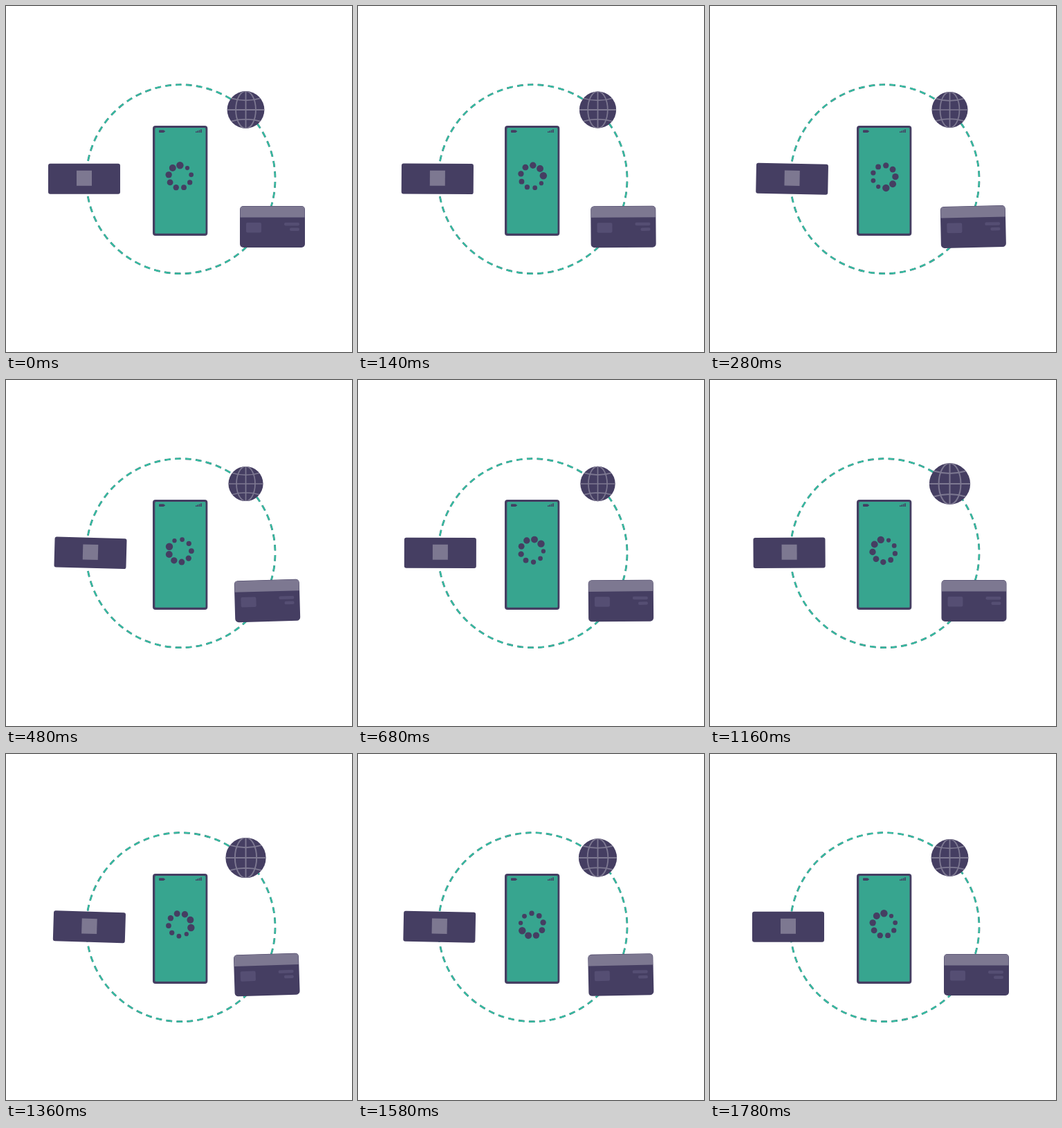
These frames come from a looping animation (500x500 px, 1.8 s). An HTML page with a canvas:

```html
<!DOCTYPE html>
<html lang="en">
<head>
<meta charset="utf-8">
<title>Payment loader</title>
<style>
html, body { margin: 0; width: 100%; height: 100%; overflow: hidden; background: #fff; }
canvas { display: block; width: 500px; height: 500px; }
</style>
</head>
<body>
<canvas id="stage"></canvas>
<script>
const LOOP = 1800, STEP = 20, TAU = Math.PI * 2;
const DARK = '#453e62', MUTED = '#7d7891', FAINT = '#554e73', GREEN = '#37a58f';

const canvas = document.getElementById('stage');
const ctx = canvas.getContext('2d');
const dpr = window.devicePixelRatio || 1;
canvas.width = canvas.height = 500 * dpr;

// Keys are [progress, value] pairs, eased in and out between neighbours.
const globeR = [[0, 26.9], [1 / 3, 24.9], [2 / 3, 29.7], [1, 26.9]];
const badgeX = [[0, 113], [.27, 122], [.57, 112], [.8, 121], [1, 113]];
const badgeTilt = [[0, 0], [.25, 1.6], [.54, -1.8], [.8, 1.9], [1, 0]];
const cardX = [[0, 385], [.27, 377.5], [.55, 384.4], [.8, 376.3], [1, 385]];
const cardTilt = [[0, 0], [.24, -1.7], [.55, 1.1], [.8, -2], [1, 0]];

function tween(keys, p) {
  let i = 1;
  while (i < keys.length - 1 && p > keys[i][0]) i++;
  const [p0, a] = keys[i - 1], [p1, b] = keys[i];
  const u = (p - p0) / (p1 - p0);
  return a + (b - a) * u * u * (3 - 2 * u);
}

function box(x, y, w, h, r, color) {
  ctx.fillStyle = color;
  ctx.beginPath();
  ctx.roundRect(x, y, w, h, r);
  ctx.fill();
}

function dot(x, y, r, color) {
  ctx.fillStyle = color;
  ctx.beginPath();
  ctx.arc(x, y, r, 0, TAU);
  ctx.fill();
}

function placed(x, y, deg, draw) {
  ctx.save();
  ctx.translate(x, y);
  ctx.rotate(deg * Math.PI / 180);
  draw();
  ctx.restore();
}

function ring(p) {
  const r = 136.5, pitch = TAU * r / 57, dash = 8.6;
  ctx.save();
  ctx.translate(252.5, 250.2);
  ctx.rotate(-Math.PI / 2 - (3.3 + p * 3.5) / r);
  ctx.setLineDash([dash, pitch - dash]);
  ctx.lineDashOffset = dash / 2;
  for (const [width, color] of [[2.7, '#3f6b70'], [2, '#34c2a5']]) {
    ctx.lineWidth = width;
    ctx.strokeStyle = color;
    ctx.beginPath();
    ctx.arc(0, 0, r, 0, TAU);
    ctx.stroke();
  }
  ctx.restore();
}

function phone() {
  box(212, 173, 79.3, 159, 4, DARK);
  box(215.3, 176, 73.2, 152.8, 1.5, GREEN);
  box(221, 179.2, 7.6, 3.8, 1, DARK);
  box(228, 180.2, 1.8, 1.8, .5, DARK);
  for (let i = 0; i < 4; i++) {
    const h = 1.8 + i * .95;
    box(274 + i * 2.4, 183 - h, 1.6, h, 0, DARK);
  }
}

function spinner(p) {
  for (let i = 0; i < 9; i++) {
    const a = -Math.PI / 2 + TAU * (p * 3 - i / 9);
    dot(251.4 + 16.5 * Math.cos(a), 246.7 + 16.5 * Math.sin(a), 5.2 - i * .26, DARK);
  }
}

function globe(p) {
  const s = tween(globeR, p) / 27;
  ctx.save();
  ctx.translate(346.5, 150);
  ctx.scale(s, s);
  dot(0, 0, 27, DARK);
  ctx.clip();
  ctx.strokeStyle = MUTED;
  ctx.lineWidth = 1.8;
  ctx.beginPath();
  ctx.moveTo(0, -27);
  ctx.lineTo(0, 27);
  ctx.moveTo(-27, 0);
  ctx.lineTo(27, 0);
  for (const k of [-1, 1]) {
    ctx.moveTo(-22, 17 * k);
    ctx.quadraticCurveTo(0, 10.5 * k, 22, 17 * k);
  }
  ctx.moveTo(14.5, 0);
  ctx.ellipse(0, 0, 14.5, 27, 0, 0, TAU);
  ctx.stroke();
  ctx.restore();
}

function badge() {
  box(-52, -22, 104, 44, 3, DARK);
  box(-11, -12, 22, 22, 0, MUTED);
}

function card() {
  box(-47, -30, 94, 60, 5, DARK);
  box(-46.5, -29.5, 93, 16, [4, 4, 0, 0], MUTED);
  box(-38, -6, 22, 14.5, 2, FAINT);
  box(17, -6, 22, 4.5, 2, FAINT);
  box(25, 1.6, 14, 4.5, 2, FAINT);
}

function draw(ms) {
  const t = Math.floor(ms % LOOP / STEP) * STEP;
  const p = t / (LOOP - STEP);
  ctx.setTransform(dpr, 0, 0, dpr, 0, 0);
  ctx.fillStyle = '#fff';
  ctx.fillRect(0, 0, 500, 500);
  ring(p);
  phone();
  spinner(p);
  globe(p);
  placed(tween(badgeX, p), 249.8, tween(badgeTilt, p), badge);
  placed(tween(cardX, p), 319, tween(cardTilt, p), card);
}

const start = performance.now();
function loop() {
  draw(performance.now() - start);
  requestAnimationFrame(loop);
}
loop();
</script>
</body>
</html>
```
